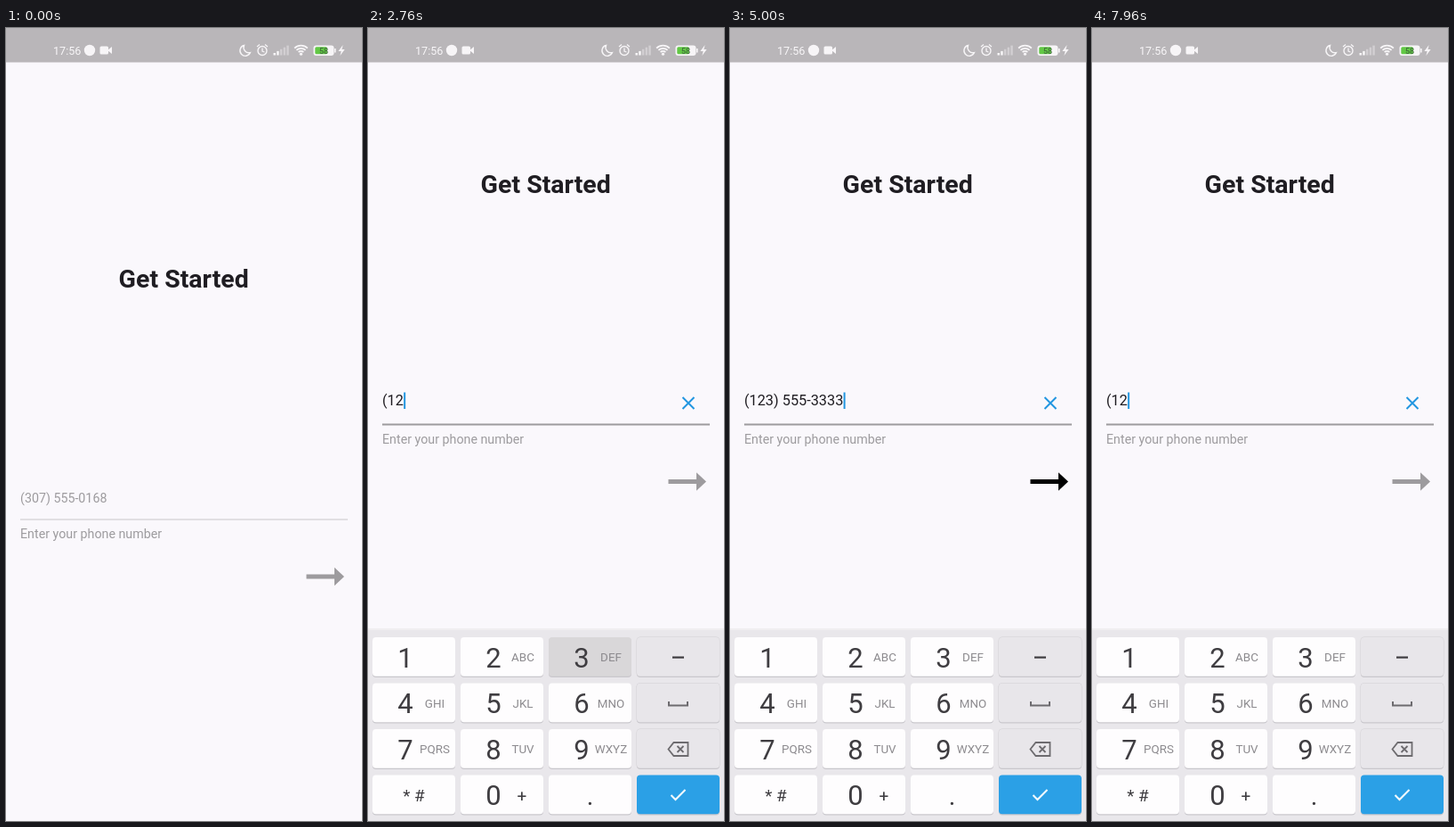
Write an HTML page with a canvas that moves like this. It is 400 px wide and 889 px high and loops after 8000 ms.

```html
<!DOCTYPE html>
<html lang="en">
<head>
<meta charset="utf-8">
<title>Get Started</title>
<style>
html, body { margin: 0; width: 100%; height: 100%; overflow: hidden; background: #faf8fc; }
canvas { display: block; width: 400px; height: 889px; }
</style>
</head>
<body>
<canvas id="stage"></canvas>
<script>
const W = 400, H = 889, LOOP = 8000;
const FONT = 'Roboto, Arial, sans-serif';
const BLUE = '#2196e0', GREY = '#9d9b9e', INK = '#1f1d22';
const PLACEHOLDER = '(307) 555-0168';
const FOCUS = 900, HOLD = 110;

// Taps: release time and key; '<' deletes the last digit.
const taps = [
  [2200, '1'], [2600, '2'], [2800, '3'], [3040, '5'], [3270, '5'],
  [3500, '5'], [3860, '3'], [4170, '3'], [4440, '3'], [4780, '3'],
  [5500, '<'], [5800, '<'], [6260, '3'], [6500, '3'],
  ...[6800, 6940, 7110, 7290, 7470, 7650, 7830, 7940].map(t => [t, '<'])
];

const keyRows = [
  [['1'], ['2', 'ABC'], ['3', 'DEF'], ['-']],
  [['4', 'GHI'], ['5', 'JKL'], ['6', 'MNO'], ['space']],
  [['7', 'PQRS'], ['8', 'TUV'], ['9', 'WXYZ'], ['<']],
  [['*#'], ['0', '+'], ['.'], ['ok']]
];

const canvas = document.getElementById('stage');
const ctx = canvas.getContext('2d');
const dpr = window.devicePixelRatio || 1;
canvas.width = W * dpr;
canvas.height = H * dpr;

const easeOut = (t, start, span) => {
  const p = Math.min(1, Math.max(0, (t - start) / span));
  return 1 - (1 - p) ** 3;
};

function text(str, x, y, size, color, align = 'left', weight = 400) {
  ctx.font = `${weight} ${size}px ${FONT}`;
  ctx.textAlign = align;
  ctx.fillStyle = color;
  ctx.fillText(str, x, y);
}

function rect(x, y, w, h, color) {
  ctx.fillStyle = color;
  ctx.fillRect(x, y, w, h);
}

function round(x, y, w, h, r, color) {
  ctx.beginPath();
  ctx.roundRect(x, y, w, h, r);
  ctx.fillStyle = color;
  ctx.fill();
}

function disc(x, y, r, color) {
  ctx.beginPath();
  ctx.arc(x, y, r, 0, Math.PI * 2);
  ctx.fillStyle = color;
  ctx.fill();
}

function shape(d, color, width) {
  const path = new Path2D(d);
  if (width) {
    ctx.lineWidth = width;
    ctx.strokeStyle = color;
    ctx.stroke(path);
  } else {
    ctx.fillStyle = color;
    ctx.fill(path);
  }
}

function arc(x, y, r, from, to, color, width) {
  ctx.beginPath();
  ctx.arc(x, y, r, from, to);
  ctx.lineWidth = width;
  ctx.strokeStyle = color;
  ctx.stroke();
}

function statusBar() {
  const c = '#f7f5f7';
  rect(0, 0, W, 38.5, '#b9b6b9');
  text('17:56', 53, 29.6, 12.6, c);
  disc(94, 25, 6.2, c);
  round(105.5, 20.5, 9.5, 9, 1.5, c);
  shape('M114 25L119 21V29Z', c);
  shape('M267.5 19.5A6 6 0 1 0 274.5 27.6A6 6 0 0 1 267.5 19.5Z', c, 1.4);
  arc(288, 25.5, 5, 0, Math.PI * 2, c, 1.4);
  shape('M288 22.5V26L290.5 27M282 21L285 18.6M294 21L291 18.6', c, 1.3);
  for (let i = 0; i < 5; i++) {
    const h = 2.5 + i * 2.1;
    rect(300.5 + i * 3.7, 30.5 - h, 2.5, h, i < 2 ? c : 'rgba(247,245,247,.4)');
  }
  for (const r of [4, 7.2, 10.4]) arc(331.5, 30, r, -Math.PI * .75, -Math.PI * .25, c, 1.8);
  disc(331.5, 29.2, 1.6, c);
  round(345.5, 19.5, 23, 11.5, 3, c);
  rect(369, 23, 1.6, 4.5, c);
  round(347.3, 21.2, 13.5, 8.1, 1.5, '#62c845');
  text('58', 357, 28.8, 9, '#40703a', 'center', 500);
  shape('M378.6 19L373.4 26H376.6L375.4 31L380.6 24H377.4Z', c);
}

function format(d) {
  if (d.length <= 3) return '(' + d;
  const head = `(${d.slice(0, 3)}) ${d.slice(3, 6)}`;
  return d.length > 6 ? `${head}-${d.slice(6)}` : head;
}

function inputAt(t) {
  let digits = '', changed = FOCUS, pressed = '';
  for (const [at, key] of taps) {
    if (t >= at) {
      digits = key === '<' ? digits.slice(0, -1) : digits + key;
      changed = at;
    } else if (t >= at - HOLD) {
      pressed = key;
    }
  }
  return { digits, changed, pressed };
}

function form(t, { digits, changed }) {
  const focused = t >= FOCUS;
  const done = digits.length === 10;
  const caretOn = focused && (t - changed) % 1000 < 500;
  ctx.save();
  ctx.translate(0, -106.5 * easeOut(t, 1018, 300));
  text('Get Started', 199.7, 291.2, 28.5, INK, 'center', 700);

  if (digits) {
    const value = format(digits);
    text(value, 16, 529.8, 16.3, INK);
    if (caretOn) rect(16.3 + ctx.measureText(value).width, 515, 2, 18.5, BLUE);
    shape('M353.5 520.5L366.5 533.5M366.5 520.5L353.5 533.5', BLUE, 2);
  } else {
    text(PLACEHOLDER, 16, 532, 14.26, GREY);
    if (caretOn) rect(16, 519, 2, 16, BLUE);
  }

  rect(16, 550, 368, 2, focused ? GREY : '#e1dfe2');
  text('Enter your phone number', 16, 572.3, 14.26, GREY);
  shape('M337.5 612.5H369V604.8L380 615L369 625.2V617.5H337.5Z', done ? '#000' : GREY);
  ctx.restore();
}

function keyFace(name, sub, x, cy) {
  const mid = x + 46.5, ink = '#3f3d41', icon = '#6d6b6f';
  ctx.save();
  ctx.translate(mid, cy);
  if (name === '-') {
    rect(-6.5, -1, 13, 2.2, ink);
  } else if (name === 'space') {
    shape('M-10.5 -2V2.5H10.5V-2', icon, 2);
  } else if (name === '<') {
    shape('M-11 0L-5 -7.5H11V7.5H-5ZM-1 -3.5L6 3.5M6 -3.5L-1 3.5', icon, 1.8);
  } else if (name === 'ok') {
    shape('M-8 0L-3 5L8 -6', '#fff', 2);
  } else if (name === '*#') {
    text('* #', 0, 7, 19, ink, 'center');
  } else if (name === '.') {
    text('.', 0, 11, 29, ink, 'center');
  } else {
    text(name, -9.5, 11, 31, ink, 'center');
    if (sub === '+') text(sub, 22.5, 7, 19, ink, 'center');
    else if (sub) text(sub, 23.5, 4.9, 13.4, '#8d8b8f', 'center');
  }
  ctx.restore();
}

function keyboard(t, pressed) {
  const p = easeOut(t, 1000, 300);
  if (!p) return;
  ctx.save();
  ctx.translate(0, 216 * (1 - p));
  rect(0, 673, W, 2, '#f0eef1');
  rect(0, 675, W, 216, '#e9e7eb');
  keyRows.forEach((row, r) => row.forEach(([name, sub], c) => {
    const x = 5 + c * 99, y = 683 + r * 51.5, down = name === pressed;
    const side = c === 3;
    let fill = down ? '#d9d7d9' : '#fefdfe';
    if (side) fill = down ? '#d0ced2' : '#e8e6ea';
    if (name === 'ok') fill = '#2ba0e6';
    if (side && name !== 'ok') round(x - .5, y - .5, 94, 45, 4.5, '#d2d0d4');
    round(x, y + 1, 93, 44, 4, '#c9c7cc');
    round(x, y, 93, 43.8, 4, fill);
    keyFace(name, sub, x, y + 22.5);
  }));
  ctx.restore();
}

function draw(now) {
  const t = now % LOOP;
  const input = inputAt(t);
  ctx.setTransform(dpr, 0, 0, dpr, 0, 0);
  rect(0, 0, W, H, '#faf8fc');
  form(t, input);
  keyboard(t, input.pressed);
  statusBar();
}

const start = performance.now();
function tick() {
  draw(performance.now() - start);
  requestAnimationFrame(tick);
}
tick();
</script>
</body>
</html>
```
